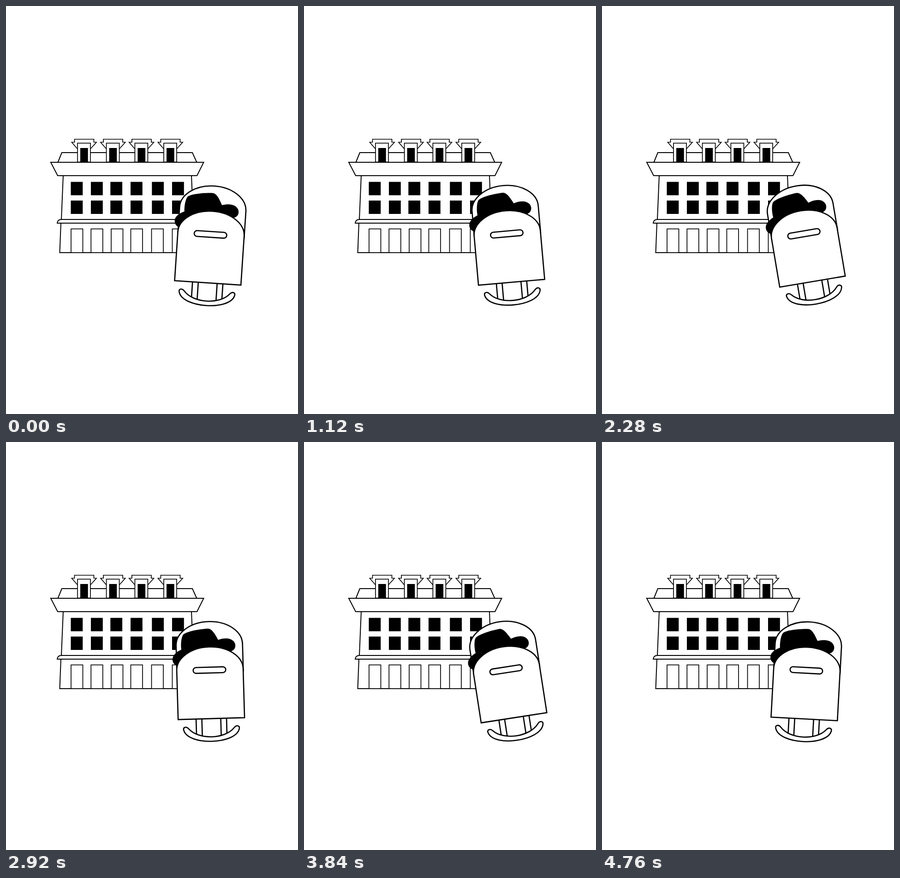
An HTML page for the animation above (4800 ms loop, 633x885 px).

```html
<!DOCTYPE html>
<html lang="en">
<head>
<meta charset="utf-8">
<title>Rocking mailbox</title>
<style>
  html, body { margin: 0; height: 100%; overflow: hidden; background: #fff; }
  svg { display: block; width: 633px; height: 885px; fill: #fff; stroke: #000; }
  .solid { fill: #000; stroke: none; }
</style>
</head>
<body>
<svg viewBox="0 0 633 885">
  <g stroke-width="2">
    <path d="M112.5 339L121 318H404L413.5 339Z"/>
    <path d="M124 368L120 463H406L402 368Z"/>
    <path d="M119 471L116.5 535H410L408 471Z"/>
    <path d="M111 471Q112 463 120 463H405Q413 463 414 471Z"/>
    <path d="M97 339H428.5L414 368H112Z"/>
  </g>
  <g id="openings" stroke-width="1.7"></g>
  <g id="mailbox" stroke-width="2.6">
    <path d="M371 500V440A72 50.3 0 0 1 515 440V500"/>
    <path class="solid" d="M373 484C363 481 360 471 364 463C368 456 375 452 382 449C381 439 382 425 386 418C389 411 420 405.5 441 405C449 405 456 417 462.5 430C475 426 488 426 495 433C502 440 501 452 490 455.5C485 457 482 457 478 456L440 480Z"/>
    <path d="M409.7 598V640H422.2V598M463.2 598V640H475.7V598"/>
    <path d="M382.3 624C380.5 617 388 615 393 621C414 646 471 646 492 621C497 615 504.5 617 502.7 624C494 658 391 658 382.3 624Z"/>
    <path d="M370.8 600.3V494A72 49.4 0 0 1 514.8 494V600.3Z"/>
    <rect x="406.4" y="488.6" width="70.6" height="12.6" rx="6.3"/>
  </g>
</svg>
<script>
  const openings = document.getElementById('openings');
  const mailbox = document.getElementById('mailbox');

  const rect = (x, y, w, h, cls = '') =>
    `<rect class="${cls}" x="${x}" y="${y}" width="${w}" height="${h}"/>`;

  const dormer = x => `<g transform="translate(${x})">
    <path d="M142.5 295.5H148.5V289H190.5V295.5H196L183 310H155Z"/>
    ${rect(155, 297.5, 28, 41)}${rect(161, 308, 16.7, 30.5, 'solid')}</g>`;

  openings.innerHTML =
    [0, 62.6, 124.4, 187].map(dormer).join('') +
    [140.5, 184, 226.3, 270, 316.3, 360].map(x =>
      rect(x, 381.5, 25.8, 29, 'solid') + rect(x, 422, 25.8, 29, 'solid')).join('') +
    [141, 184.3, 228, 270.5, 315.5, 360.5].map(x => rect(x, 483.5, 25.5, 51.5)).join('');

  // Swing turning points: [time in ms, angle in degrees]
  const LOOP = 4800, STEP = 40;
  const swing = [[0, 3.8], [40, 3.8], [780, -12], [1563, 4],
                 [2407, -12], [3200, 4], [4000, -12], [LOOP, 3.9]];

  function angleAt(t) {
    const i = swing.findIndex(([time]) => time > t);
    const [t0, a0] = swing[i - 1], [t1, a1] = swing[i];
    return a0 + (a1 - a0) * (t - t0) / (t1 - t0);
  }

  function draw() {
    const t = Math.floor(performance.now() % LOOP / STEP) * STEP;
    mailbox.setAttribute('transform', `rotate(${angleAt(t)} 435 518.5)`);
    requestAnimationFrame(draw);
  }
  draw();
</script>
</body>
</html>
```
